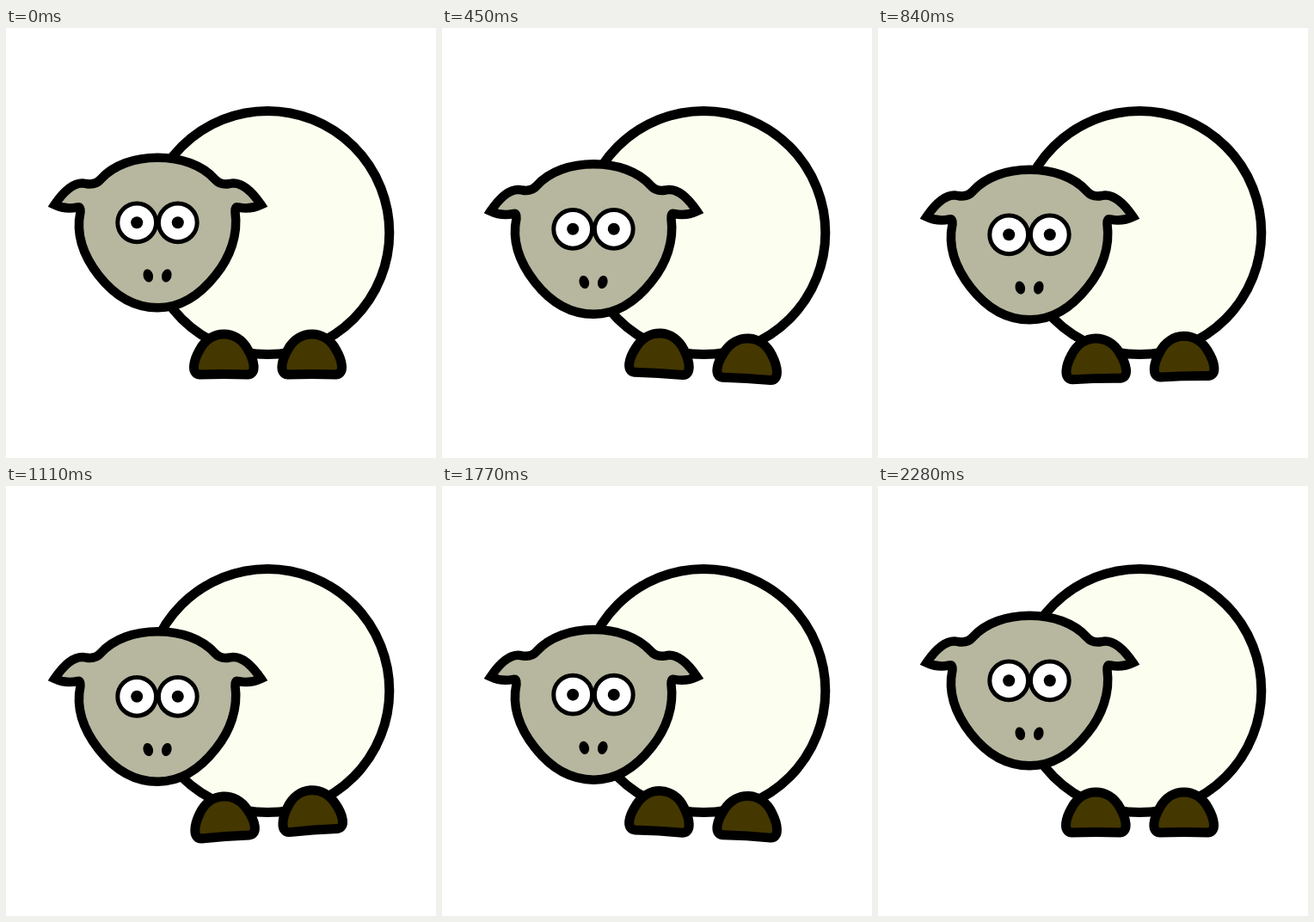
An HTML page for the animation above (2.31 s loop, 500 by 500 pixels).

```html
<!DOCTYPE html>
<html lang="en">
<head>
<meta charset="utf-8">
<title>Walking sheep</title>
<style>
  html, body { margin: 0; width: 100%; height: 100%; overflow: hidden; background: #fff; }
  svg { display: block; width: 100vw; height: 100vh; }
</style>
</head>
<body>
<svg viewBox="0 0 500 500" stroke="#000">
  <defs>
    <path id="foot" fill="#443700" stroke-width="11" d="M-28 25C-39 24-35 8-28-4C-15-28 15-28 28-4C35 8 39 24 28 25Q0 24-28 25Z"/>
    <g id="eye">
      <circle r="22.4" fill="#fff" stroke-width="5"/>
      <circle r="7" stroke="none"/>
    </g>
    <ellipse id="nostril" rx="5.7" ry="7.7" stroke="none"/>
  </defs>
  <circle cx="304.3" cy="238" r="141.5" fill="#fcfff0" stroke-width="11"/>
  <g id="feet">
    <use href="#foot" x="-51.2"/>
    <use href="#foot" x="51.2"/>
  </g>
  <g id="head">
    <path fill="#b7b7a0" stroke-width="10.5" stroke-miterlimit="8" d="M110 176
      C125 159 150 150.7 176.5 150.7 C203 150.7 228 159 243 176
      Q249 183 260 181 C272 178 284 187 296.5 205.5
      C287 210 277 210 270 208.5 Q266 207.5 266.5 214
      C270 240 261 266 244 287 C226 310 205 325.3 176.5 325.3
      C148 325.3 126 311 108 288 C90 265 81 240 86.5 214
      Q87 207.5 83 208.5 C76 210 66 210 56.5 205.5
      C69 187 81 178 93 181 Q104 183 110 176Z"/>
    <use href="#eye" x="152.2" y="226.3"/>
    <use href="#eye" x="199.8" y="226.3"/>
    <use href="#nostril" transform="translate(165.3 288) rotate(-15)"/>
    <use href="#nostril" transform="translate(186.8 288) rotate(15)"/>
  </g>
</svg>
<script>
const LOOP = 2310, REST = 2280, STEP = 30, FOOT_GAP = 102.4;
const head = document.getElementById('head');
const feet = document.getElementById('feet');

// Keys are [time, value] pairs
const headDrop = [[0, 0], [1500, 25], [REST, 0], [LOOP, 0]];
const leftDrop = [[0, 0], [360, -3], [720, 5], [1440, 5], [1800, -2], [REST, 0], [LOOP, 0]];
const rightDrop = [[0, 0], [360, 5], [720, 5], [1080, -3], [1440, 5], [1800, 4.5], [REST, 0], [LOOP, 0]];

function tween(keys, t) {
  const i = keys.findIndex(key => key[0] > t);
  const [t0, v0] = keys[i - 1], [t1, v1] = keys[i];
  return v0 + (v1 - v0) * (t - t0) / (t1 - t0);
}

function draw(now) {
  const t = Math.floor(now % LOOP / STEP) * STEP;
  const left = tween(leftDrop, t), right = tween(rightDrop, t);
  const angle = Math.atan2(right - left, FOOT_GAP) * 180 / Math.PI;
  head.setAttribute('transform', `translate(0 ${tween(headDrop, t)})`);
  feet.setAttribute('transform', `translate(304.5 ${378 + (left + right) / 2}) rotate(${angle})`);
  requestAnimationFrame(draw);
}
draw(0);
</script>
</body>
</html>
```
